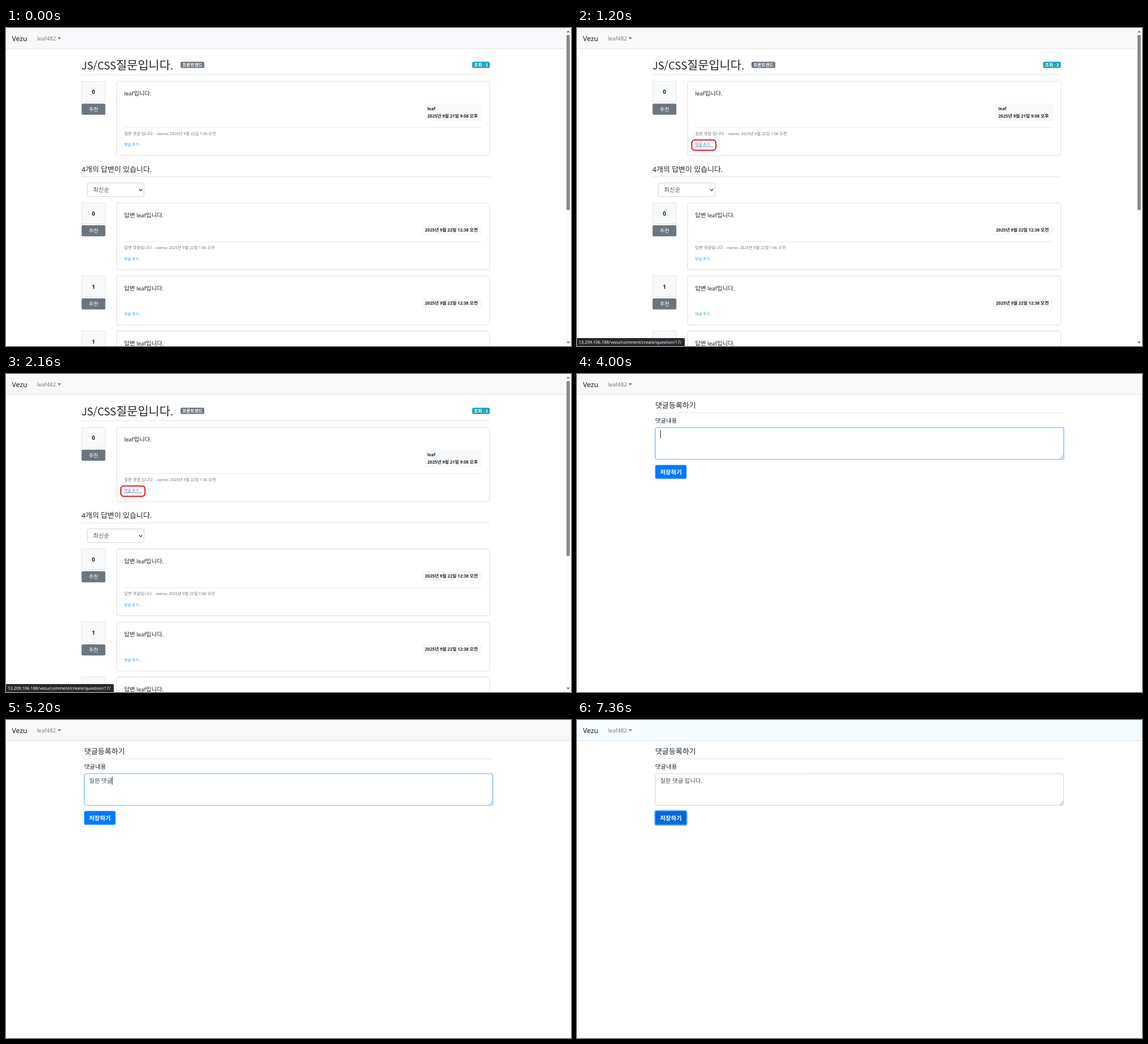
Animation, 998 px wide and 561 px high, one loop 8000 ms. Source, as an HTML page with a canvas:

```html
<!DOCTYPE html>
<html lang="ko">
<head>
<meta charset="utf-8">
<title>댓글 등록</title>
<style>
  html, body { margin: 0; width: 100%; height: 100%; overflow: hidden; background: #fff; }
  canvas { display: block; width: 998px; height: 561px; }
</style>
</head>
<body>
<canvas id="stage" width="998" height="561"></canvas>
<script>
const ctx = document.getElementById('stage').getContext('2d');
const LOOP = 8000;
const INK = '#212529', GRAY = '#6c757d', LINE = '#dee2e6', LIGHT = '#f8f9fa', BLUE = '#007bff', FIELD = '#495057';
const BODY = 10.4, HEADING = 13, BADGE = 7.8;
const HANGUL = '"Noto Sans CJK KR", "Noto Sans CJK", sans-serif';
const LATIN = '"Noto Sans", "Open Sans", sans-serif';

const scenes = [
  { at: 0, draw: questionPage, bar: '#f8f8fa' },
  { at: 1200, draw: questionPage, bar: '#f8f8f8', hover: true },
  { at: 2800, draw: commentPage, bar: '#f6fbff', value: '' },
  { at: 4000, draw: commentPage, bar: '#f7f8f8', value: '', typing: true },
  { at: 5200, draw: commentPage, bar: '#f8f8f8', value: '질문 댓글', typing: true },
  { at: 6400, draw: commentPage, bar: '#f6fbff', value: '질문 댓글 입니다.', saving: true },
];

// Latin runs are set slightly smaller than Hangul so both look even. Returns the end x.
function text(str, x, y, { size = BODY, color = INK, weight = 400, latin = LATIN, ratio = weight > 600 ? 0.97 : 0.94 } = {}) {
  ctx.fillStyle = color;
  for (const run of str.match(/[가-힣]+|[^가-힣]+/g) || []) {
    const korean = /^[가-힣]/.exec(run);
    ctx.font = `${weight} ${korean ? size : size * ratio}px ${korean ? HANGUL : latin}`;
    ctx.fillText(run, x, y);
    x += ctx.measureText(run).width;
  }
  return x;
}

function box(x, y, w, h, { fill, stroke, radius = 2.6, width = 1 } = {}) {
  ctx.beginPath();
  ctx.roundRect(x, y, w, h, radius);
  if (fill) { ctx.fillStyle = fill; ctx.fill(); }
  if (stroke) { ctx.strokeStyle = stroke; ctx.lineWidth = width; ctx.stroke(); }
}

function rect(x, y, w, h, color) {
  ctx.fillStyle = color;
  ctx.fillRect(x, y, w, h);
}

function path(points, color, width) {
  ctx.beginPath();
  points.forEach(([x, y]) => ctx.lineTo(x, y));
  if (width) {
    ctx.strokeStyle = color;
    ctx.lineWidth = width;
    ctx.stroke();
  } else {
    ctx.fillStyle = color;
    ctx.fill();
  }
}

function navbar(color) {
  rect(0, 0, 998, 36, color);
  rect(0, 36, 998, 1, '#e6e7e8');
  text('Vezu', 10.5, 23.3, { size: HEADING, color: '#1c1c1c' });
  text('leaf482', 54.7, 22.3, { color: '#808080' });
  path([[91, 16.6], [97.4, 16.6], [94.2, 19.9]], '#777');
}

function scrollbar() {
  rect(988, 0, 10, 561, '#fcfcfc');
  box(990, 12, 6, 309.5, { fill: '#8b8b8b', radius: 3 });
  path([[989.8, 8], [996.2, 8], [993, 4]], '#8b8b8b');
  path([[989.8, 553], [996.2, 553], [993, 557]], '#8b8b8b');
}

function votes(y, count) {
  box(133.5, y + 0.5, 42, 37, { fill: LIGHT, stroke: '#e3e6e9', radius: 0 });
  text(count, 151.6, y + 22.6, { weight: 700 });
  box(133.5, y + 40, 42, 19.6, { fill: GRAY, radius: 2 });
  text('추천', 146.2, y + 53.2, { size: 9.1, color: '#fff', weight: 500 });
}

function stamp(x, y, lines) {
  box(x, y, 841 - x, 5 + 12.8 * lines.length, { fill: LIGHT });
  lines.forEach((line, i) => text(line, x + 5, y + 11.6 + 12.8 * i, { size: BADGE, weight: 700 }));
}

function post(y, h, { count, body, date, comment, linkY, hover }) {
  votes(y, count);
  box(195.5, y + 0.5, 659, h - 1, { stroke: '#dfdfdf' });
  text(body, 208.8, y + 25.5);
  if (date.length > 1) stamp(739.3, y + 39.8, date);
  else stamp(735, y + 39.8, date);
  if (comment) {
    rect(209, linkY - 33, 632, 1, '#ececec');
    text(comment, 208.8, linkY - 19.5, { size: 7.28, color: '#777' });
  }
  const color = hover ? '#3d76b0' : '#2b90ff';
  const end = text('댓글 추가 ..', 208.8, linkY, { size: 6.6, color });
  if (hover) rect(208.8, linkY + 1, end - 208.8, 0.7, color);
}

function answer(y, h, count, linkY, comment) {
  post(y, h, { count, linkY, comment, body: '답변 leaf입니다.', date: ['2025년 9월 22일 12:38 오전'] });
}

function sortSelect() {
  box(143.5, 273.3, 100.3, 24, { fill: '#fff', stroke: '#ced4da' });
  text('최신순', 153.8, 289.2, { color: FIELD });
  path([[235.2, 284.3], [237.9, 287.1], [240.6, 284.3]], '#333', 1.3);
}

function questionPage({ bar, hover }) {
  navbar(bar);

  text('JS/CSS질문입니다.', 133.2, 72.6, { size: 20.8, weight: 500, latin: HANGUL, ratio: 0.89 });
  box(308.3, 59.5, 42, 11, { fill: GRAY });
  text('프론트엔드', 311.4, 68, { size: BADGE, color: '#fff', weight: 700 });
  box(823.4, 59.5, 31.2, 11, { fill: '#17a2b8' });
  text('조회 : 2', 826.6, 68, { size: BADGE, color: '#fff', weight: 700 });
  rect(133, 82, 721.5, 1, LINE);

  post(93.5, 132, {
    count: '0', body: 'leaf입니다.', linkY: 208, hover,
    date: ['leaf', '2025년 9월 21일 9:08 오후'],
    comment: '질문 댓글 입니다. - owner, 2025년 9월 22일 1:06 오전',
  });

  text('4개의 답변이 있습니다.', 133.3, 253.6, { size: HEADING, weight: 500 });
  rect(133, 262, 721.5, 1, LINE);
  sortSelect();
  answer(308, 119, '0', 409.6, '답변 댓글입니다. - owner, 2025년 9월 22일 1:06 오전');
  answer(437, 87.5, '1', 506.8);
  answer(534, 119, '1', 636);
  scrollbar();

  if (hover) {
    box(202.8, 197.6, 42.6, 18.2, { stroke: '#e8121a', radius: 5, width: 2 });
    box(-1, 547, 191.5, 15, { fill: '#27282b', radius: [0, 2, 0, 0] });
    text('13.209.106.188/vezu/comment/create/question/17/', 3, 557, { size: 8, color: '#fff' });
  }
}

function commentPage({ bar, value, typing, saving }) {
  navbar(bar);
  text('댓글등록하기', 138.3, 60.2, { size: HEADING, weight: 500 });
  rect(138, 68, 722, 1, '#e3e4e5');
  text('댓글내용', 138.3, 85.7);

  if (typing) box(137, 93.5, 724, 58, { fill: '#bfdeff', radius: 4 });
  box(138.5, 94.8, 721, 55.6, { fill: '#fff', stroke: typing ? '#80bdff' : '#ced4da' });
  path([[853, 149.3], [858.6, 143.7]], '#777', 0.8);
  path([[856, 149.3], [858.6, 146.7]], '#777', 0.8);
  const end = text(value, 146.8, 110.8, { color: FIELD });
  if (typing) rect(Math.round(end - 0.3), 100, 1, 14, '#222');

  if (saving) box(136, 158.5, 59.6, 28.5, { fill: '#93c7ff', radius: 4.4 });
  box(138.2, 160.6, 55.2, 24.2, { fill: saving ? '#0069d9' : BLUE });
  text('저장하기', 146.8, 177, { color: '#fff', weight: 700 });
}

function frame(now) {
  const time = now % LOOP;
  const scene = scenes.findLast(({ at }) => at <= time);
  ctx.textRendering = 'geometricPrecision';
  rect(0, 0, 998, 561, '#fff');
  scene.draw(scene);
  requestAnimationFrame(frame);
}

frame(0);
</script>
</body>
</html>
```
